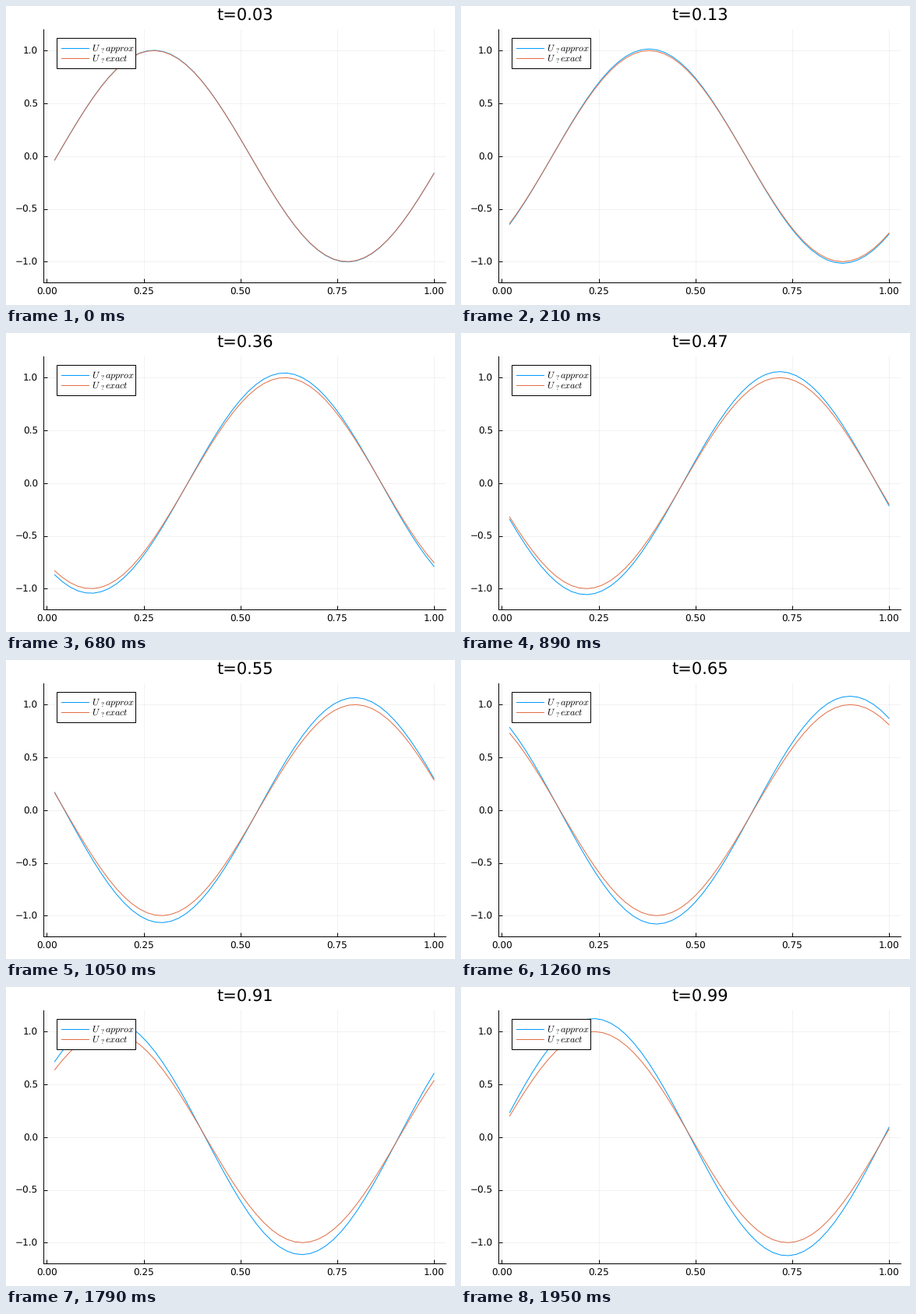
Recreate the animation shown at these times as a matplotlib script. Size 576 by 384 pixels, loop 2010 ms.

```python
import matplotlib.pyplot as plt
import numpy as np
from matplotlib.animation import FuncAnimation
from matplotlib.patches import Rectangle

W, H = 576, 384
PT = 0.75  # points per pixel at 96 dpi
BLUE, ORANGE = "#009AFA", "#E26F46"

STEPS, RATE = 38, 19  # time steps, steps per second
TICK, LOOP = 10, 2010  # ms

plt.rcParams.update({"font.family": "DejaVu Sans", "mathtext.fontset": "cm",
                     "text.hinting": "none"})

# First-order upwind advection on a periodic grid, Courant number above 1
N, COURANT = 50, 1.3
dt = COURANT / N
x = np.arange(1, N + 1) / N


def solve():
    u = np.sin(2 * np.pi * x)
    states = []
    for _ in range(STEPS):
        u = u - COURANT * (u - np.roll(u, 1))
        states.append(u)
    return states


approx = solve()

fig = plt.figure(figsize=(6, 4), dpi=96, facecolor="white")

left, right, top, bottom = 47.8, 563.7, 30.2, 355.4
ax = fig.add_axes([left / W, 1 - bottom / H, (right - left) / W, (bottom - top) / H])
ax.set(xlim=(-0.0094, 1.0294), ylim=(-1.2, 1.2),
       xticks=np.linspace(0, 1, 5), yticks=np.linspace(-1, 1, 5))
ax.set_axisbelow(True)
ax.grid(color="black", alpha=0.05, linewidth=PT)
ax.spines[["top", "right"]].set_visible(False)
ax.spines[["left", "bottom"]].set_linewidth(PT)
ax.tick_params(direction="in", length=5 * PT, width=PT, labelsize=12 * PT)
ax.tick_params(axis="x", pad=6.5 * PT)
ax.tick_params(axis="y", pad=6.8 * PT)

line_approx, = ax.plot([], [], color=BLUE, linewidth=PT)
line_exact, = ax.plot([], [], color=ORANGE, linewidth=PT)

# Pixel-space layer for title and legend
top_layer = fig.add_axes([0, 0, 1, 1], zorder=5)
top_layer.set(xlim=(0, W), ylim=(H, 0))
top_layer.axis("off")
title = top_layer.text(306.3, 18, "", fontsize=21 * PT, ha="center", va="baseline")
top_layer.add_patch(Rectangle((65, 41), 101, 39, facecolor="white",
                              edgecolor="black", linewidth=PT))


def legend_entry(y, color, word):
    top_layer.plot([71, 106], [y, y], color=color, linewidth=PT)
    base = y + 3.4
    part = top_layer.text(110, base, "$U$", fontsize=12 * PT, va="baseline")
    # Each piece starts where the one before it ends
    for label, size, drop in ((r"$\mathrm{?}$", 8.6, 3), (f"${word}$", 12, 0)):
        part = top_layer.annotate(label, (1, base + drop), xycoords=(part, "data"),
                                  fontsize=size * PT, va="baseline")


legend_entry(54, BLUE, "approx")
legend_entry(67, ORANGE, "exact")


def update(i):
    step = min(int((i + 0.5) * TICK * RATE / 1000), STEPS - 1)
    t = (step + 1) * dt
    line_approx.set_data(x, approx[step])
    line_exact.set_data(x, np.sin(2 * np.pi * (x - t)))
    title.set_text(f"t={t:.2f}")
    return line_approx, line_exact, title


anim = FuncAnimation(fig, update, frames=LOOP // TICK, interval=TICK,
                     repeat=True, repeat_delay=0, blit=False)
plt.show()
```
